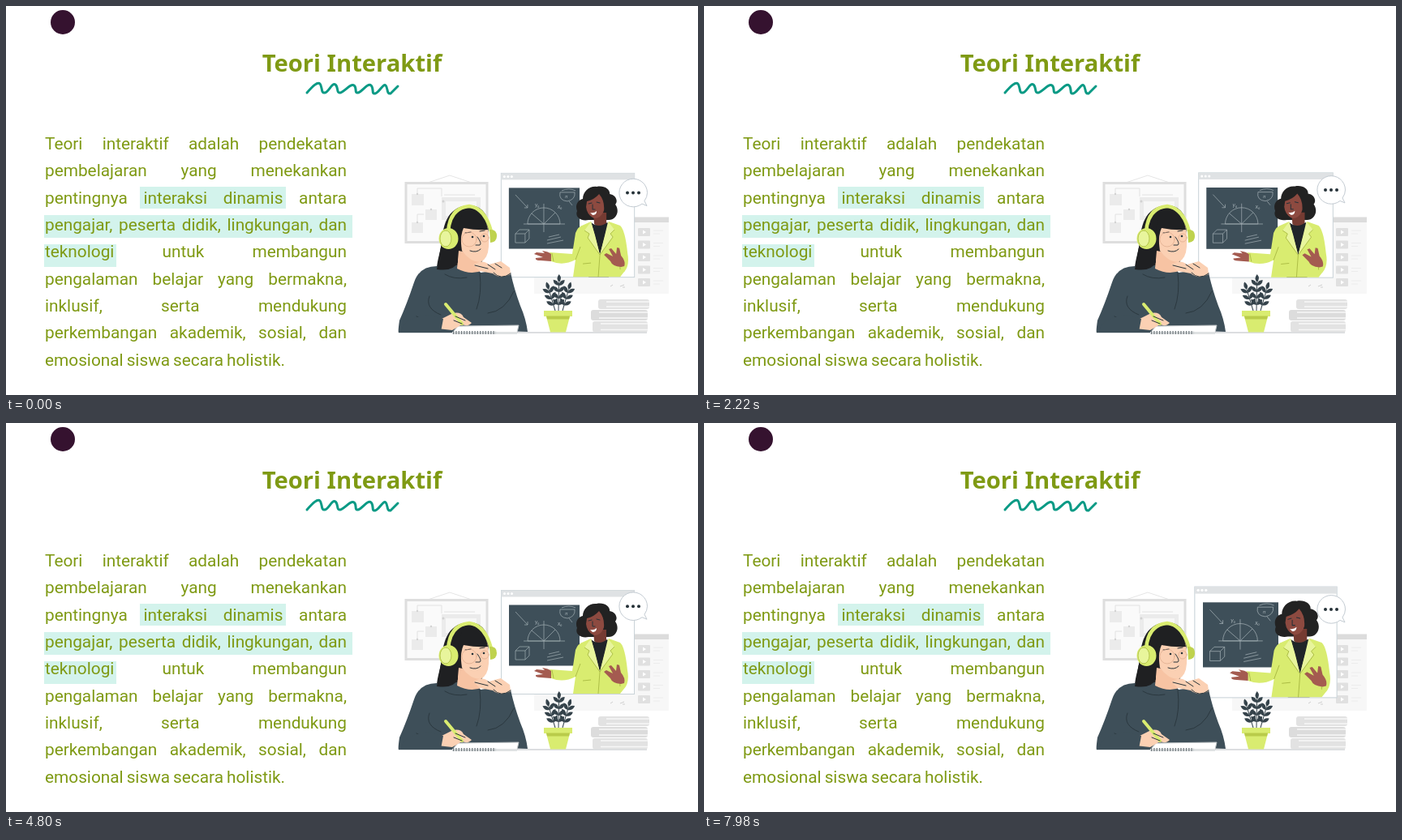
Recreate the animation shown at these times as an HTML page. Size 853 px wide and 480 px high, loop 8 s.

```html
<!DOCTYPE html>
<html lang="id">
<head>
<meta charset="utf-8">
<title>Teori Interaktif</title>
<style>
  html, body { margin: 0; width: 100%; height: 100%; overflow: hidden; background: #fff; }
  svg { position: absolute; left: 0; top: 0; }
  #copy {
    position: absolute; left: 48px; top: 154.2px; width: 372px;
    font: 20.8px/33.3px Roboto, "Open Sans", sans-serif; color: #7f9a14;
  }
  #copy div { display: flex; justify-content: space-between; white-space: nowrap; height: 33.3px; }
  #copy div:last-child { justify-content: flex-start; gap: 4px; }
  .chalk { fill: none; stroke: #a3afb4; stroke-width: .7; }
  .ink { fill: none; stroke: #263238; stroke-width: 1; stroke-linecap: round; stroke-linejoin: round; }
  .fold { fill: none; stroke: #2b383f; stroke-width: 1; stroke-linecap: round; }
  .cloth { fill: #3e4f59; }
  .lime { fill: #d9ec70; }
</style>
</head>
<body>
<svg width="853" height="480" viewBox="0 0 853 480">
  <circle cx="70" cy="20" r="15" fill="#35122f"/>
  <text x="426.5" y="81" text-anchor="middle" font-family="'Noto Sans','Open Sans',sans-serif" font-weight="700" font-size="29.2" fill="#7f9a14">Teori Interaktif</text>
  <path fill="none" stroke="#0a9a85" stroke-width="3" stroke-linecap="round" stroke-linejoin="round"
    d="M371 107C378 99 384 93 387 96S388 108 393 107S402 94 406 97S407 108 412 107S425 95 429 98S429 108 434 107S446 94 450 98S450 109 455 108S465 95 468 98S469 109 474 108L483 99"/>
  <path fill="#d3f3ec" d="M165 223h180v27H165zM47 258h380v28H47zM47 294h89v28H47z"/>

  <!-- pin board -->
  <path fill="none" stroke="#e6e6e6" d="M520 218L547 209L574 218"/>
  <rect x="493" y="218.5" width="100" height="73" fill="#fafafa" stroke="#dedede" stroke-width="3"/>
  <path fill="#ebebeb" d="M500 232h15v14h-15zM517 251h14v13h-14zM500 267h14v13h-14zM537 236h48v28h-48z"/>
  <path fill="#f7f7f7" d="M542 241h38v18h-38z"/>
  <path fill="none" stroke="#e2e2e2" d="M507 231v-6h30v10M515 257h-8v9M540 233h38"/>
  <g fill="#d2d2d2"><circle cx="507" cy="232" r="1.2"/><circle cx="524" cy="251" r="1.2"/><circle cx="539" cy="241" r="1.5"/><circle cx="507" cy="267" r="1.2"/></g>

  <!-- side panel -->
  <path fill="#f7f7f7" d="M651 335h166v20H651zM748 261h69v94h-69z"/>
  <path fill="#dcdcdc" d="M748 260.500h69v6.500h-69z"/>
  <g id="buttons"></g>
  <path stroke="#cfcfcf" fill="none" d="M745 346l3-2M757 346l5-2M760 347h3"/>

  <!-- zooming lesson window -->
  <g id="lesson">
    <rect x="610.500" y="206.500" width="164" height="128" fill="#fff" stroke="#c9d3d8"/>
    <rect x="610.500" y="206.500" width="164" height="8" fill="#dfe2e4"/>
    <g fill="#fff"><circle cx="614.500" cy="210.500" r="1.5"/><circle cx="619" cy="210.500" r="1.5"/><circle cx="623.500" cy="210.500" r="1.5"/></g>
    <rect class="cloth" x="620" y="224.500" width="87" height="75"/>
    <path class="chalk" d="M628 233L643 249M643 245v4h-4M643 269a20 20 0 0 1 40 0zM663 244v35M638 269h51M648 256l15 13l14-14M628 281h12v11h-12zM628 281l5-5h12l-5 5M645 276v11l-5 5M683 230q-2 10 9 11q10-2 9-11zM694 241l4 5M685 228q9-4 17 0M667 289l17-4M667 293l20-4M669 285l13-3"/>
    <g fill="#a3afb4" font-family="Lato, sans-serif" font-size="7" font-style="italic"><text x="652" y="248">y₀</text><text x="680" y="250">x₀</text><text x="689" y="237" font-size="6">π</text></g>

    <path fill="#222" d="M728 223C738 221 745 227 744 232C751 233 755 240 751 245C757 253 752 264 743 264L718 264C708 266 701 260 704 253C701 246 705 239 711 238C711 230 718 222 728 223Z"/>
    <path fill="#753b32" d="M724 255h16v14q-7 8-15 0z"/>
    <path fill="#8d4a40" d="M716 241Q725 239 731 232Q738 240 737 252Q734 262 725 262Q716 258 715 248Z"/>
    <path class="ink" stroke-width=".8" d="M718 244l4-1M728 242l4 1M723 245l0 6 3 0"/>
    <path fill="#fff" d="M720 255q5 1 8-2q0 5-5 5z"/>
    <path fill="#202529" d="M721 267Q731 275 741 267L748 275L743 334H718L717 274Z"/>
    <path class="lime" d="M721 266L732 307L743 266L757 271Q763 276 766 305Q769 321 761 329L757 334H699L702 313Q687 321 672 315L670 304L698 306L702 280Q705 272 712 270Z"/>
    <path fill="#e8f59c" d="M721 266L713 277L719 281L717 286L732 307L726 283ZM742 266L750 276L745 281L748 285L732 307L738 283Z"/>
    <path fill="none" stroke="#a9ba42" stroke-width=".9" d="M702 313L708 297M732 307L730 334M713 277L719 281L717 286L732 307L748 285L745 281L750 276M755 298l2 27M673 305l2 10M711 318l10-1"/>
    <path fill="#a45b50" d="M672 315L659 314Q652 314 653 311L662 310L651 306L654 304L664 305L661 302Q669 303 672 306ZM758 322Q747 321 745 315L737 307L740 305L748 309L743 300L746 299L752 306L753 298L756 299L758 308Q764 315 762 321Z"/>
  </g>

  <!-- speech bubble -->
  <g id="bubble">
    <path fill="#fff" stroke="#c3cbd2" d="M790.500 0A17.300 17.300 0 1 0 784 13.500L790 16L787 10Q790.500 5 790.500 0Z"/>
    <g fill="#263238"><circle cx="766" r="2"/><circle cx="773" r="2"/><circle cx="780" r="2"/></g>
  </g>

  <!-- student -->
  <path stroke="#b9bec1" stroke-width="1.2" d="M484 403H790"/>
  <path fill="#1f2022" d="M573 246C554 245 540 258 538 285C536 303 531 314 531 325L583 324L592 303L595 272Q593 248 573 246Z"/>
  <path class="cloth" d="M533 321Q510 320 503 341Q494 368 485 388Q483 402 484 403H552L581 400L643 402Q641 386 634 370Q626 348 622 329L606 326L585 329L576 319Z"/>
  <path fill="#f7c3a3" d="M558 302L556 324Q573 333 588 326L583 307Z"/>
  <path fill="#1f2022" d="M537 292L557 282L557 316Q552 328 531 325Z"/>
  <path fill="#fbd0b3" d="M559 277Q561 263 578 260L593 270Q596 282 595 297Q594 312 585 316Q572 316 562 302Z"/>
  <path fill="#1f2022" d="M556 291Q556 270 562 258L590 258L594 276Q580 277 564 274Q560 282 561 297Z"/>
  <g class="ink"><path d="M566 280l7-1M584 278l6-1M581 285q6 8 3 10l-5 0M572 302q8 3 13-2"/><circle cx="571" cy="288" r="9" stroke="#dca98c" stroke-width=".7"/><circle cx="590" cy="286" r="5" stroke="#dca98c" stroke-width=".7"/></g>
  <g fill="#263238"><circle cx="575" cy="285" r="1.300"/><circle cx="589" cy="284" r="1.300"/></g>
  <path fill="none" stroke="#d9ec70" stroke-width="4.500" d="M545 279Q547 249 571 247Q590 249 598 278"/>
  <path fill="#bfd24d" d="M596 276Q605 275 605 284Q605 291 597 292Z"/>
  <ellipse class="lime" cx="545.500" cy="287" rx="12" ry="13"/>
  <ellipse cx="542" cy="287" rx="7" ry="10" fill="#e8f59c" stroke="#b4c54d"/>
  <path fill="#fbd0b3" d="M576 319Q588 312 595 319L610 315L621 323L622 331Q610 338 600 330L584 327Z"/>
  <path class="ink" stroke="#d28d70" stroke-width=".8" d="M578 320l16 4M594 319l9 6M603 318l8 5"/>
  <path class="fold" d="M522 358Q516 373 536 381M506 383Q524 392 549 392M601 329Q610 339 622 330M626 352Q615 377 594 379M584 329Q587 355 580 374M541 331Q552 338 568 335"/>
  <path fill="#fff" stroke="#bec3c5" d="M550 403L557 395L632 394L630 403Z"/>
  <path fill="#dfe2e3" d="M550 402h80v3h-80z"/>
  <path stroke="#777f83" stroke-width="4" stroke-dasharray="1.300 2" d="M551 403H604"/>
  <path fill="#fbd0b3" d="M535 387L551 379Q561 377 564 384L574 391Q570 396 562 393L550 400L532 398Z"/>
  <path stroke="#d9ec70" stroke-width="4" stroke-linecap="round" d="M542 368L562 392"/>
  <path class="ink" stroke="#d28d70" stroke-width=".8" d="M552 388l10 4M554 383l12 5"/>
  <path class="cloth" d="M519 381L539 386L536 402H488Q486 387 519 381Z"/>

  <!-- plant and books -->
  <g id="plant" fill="#35434b"></g>
  <path class="lime" d="M663 376H698V383H695L690 402.500H671L666 383H663Z"/>
  <path fill="#b9cb4a" d="M666 382.500h29l-1 4h-27z"/>
  <g id="books"></g>
</svg>
<div id="copy"></div>

<script>
const LOOP = 8000, BEAT = 5440, FLOAT = BEAT / 4, LEAD = 10;
const lines = [
  'Teori interaktif adalah pendekatan',
  'pembelajaran yang menekankan',
  'pentingnya interaksi dinamis antara',
  'pengajar, peserta didik, lingkungan, dan',
  'teknologi untuk membangun',
  'pengalaman belajar yang bermakna,',
  'inklusif, serta mendukung',
  'perkembangan akademik, sosial, dan',
  'emosional siswa secara holistik.'
];
const byId = id => document.getElementById(id);
const wrapWords = line => line.split(' ').map(word => `<span>${word}</span>`).join('');
byId('copy').innerHTML = lines.map(line => `<div>${wrapWords(line)}</div>`).join('');

byId('buttons').innerHTML = [274, 289.5, 305, 320.5, 336].map(y => `
  <rect x="779" y="${y}" width="15" height="10" rx="1" fill="#e0e0e0"/>
  <path fill="#fff" d="M785 ${y + 2.5}l4 2.500l-4 2.500z"/>
  <path stroke="#ececec" d="M798 ${y + 3}h12M798 ${y + 7}h8"/>`).join('');

const leaf = (y, angle) =>
  `<path transform="translate(0 ${y}) rotate(${angle})" d="M0 0Q-4.500-5 0-10Q4.500-5 0 0"/>`;
const stem = (x, tilt, pairs) => {
  const top = -pairs * 8 - 3;
  let leaves = leaf(top, 0);
  for (let i = 0; i < pairs; i++) leaves += leaf(-8 * i - 7, -45) + leaf(-8 * i - 7, 45);
  return `<g transform="translate(${x} 376) rotate(${tilt})"><path stroke="#35434b" d="M0 0V${top}"/>${leaves}</g>`;
};
byId('plant').innerHTML = stem(677, -17, 3) + stem(681, 1, 4) + stem(686, 16, 3);

const book = (x, y, w, h, fill) => `
  <rect x="${x}" y="${y}" width="${w}" height="${h}" rx="3" fill="${fill}"/>
  <path stroke="#f7f7f7" stroke-width="1.500" d="M${x + 10} ${y + 3}H${x + w}M${x + 10} ${y + h - 3}H${x + w}"/>`;
byId('books').innerHTML =
  book(730, 362, 63, 12, '#e2e2e2') + book(721, 375, 70, 13, '#dcdcdc') + book(723, 389, 68, 13.5, '#e2e2e2');

// Heartbeat: two swells, then a rest; [share of the beat, scale]
const heartbeat = [[0, 1], [.1, 1.1], [.3, 1], [.4, 1], [.5, 1.1], [.6, 1], [1, 1]];

function scaleAt(phase) {
  const i = heartbeat.findIndex(([end]) => end > phase);
  const [p0, a] = heartbeat[i - 1], [p1, b] = heartbeat[i];
  return a + (b - a) * (phase - p0) / (p1 - p0);
}

function draw() {
  const t = performance.now() % LOOP + LEAD;
  const bubbleY = 228.35 + 2.2 * Math.cos(2 * Math.PI * t / FLOAT);
  byId('lesson').setAttribute('transform',
    `translate(692.5 270.8) scale(${scaleAt(t / BEAT % 1)}) translate(-692.5 -270.8)`);
  byId('bubble').setAttribute('transform', `translate(0 ${bubbleY})`);
  requestAnimationFrame(draw);
}
draw();
</script>
</body>
</html>
```
